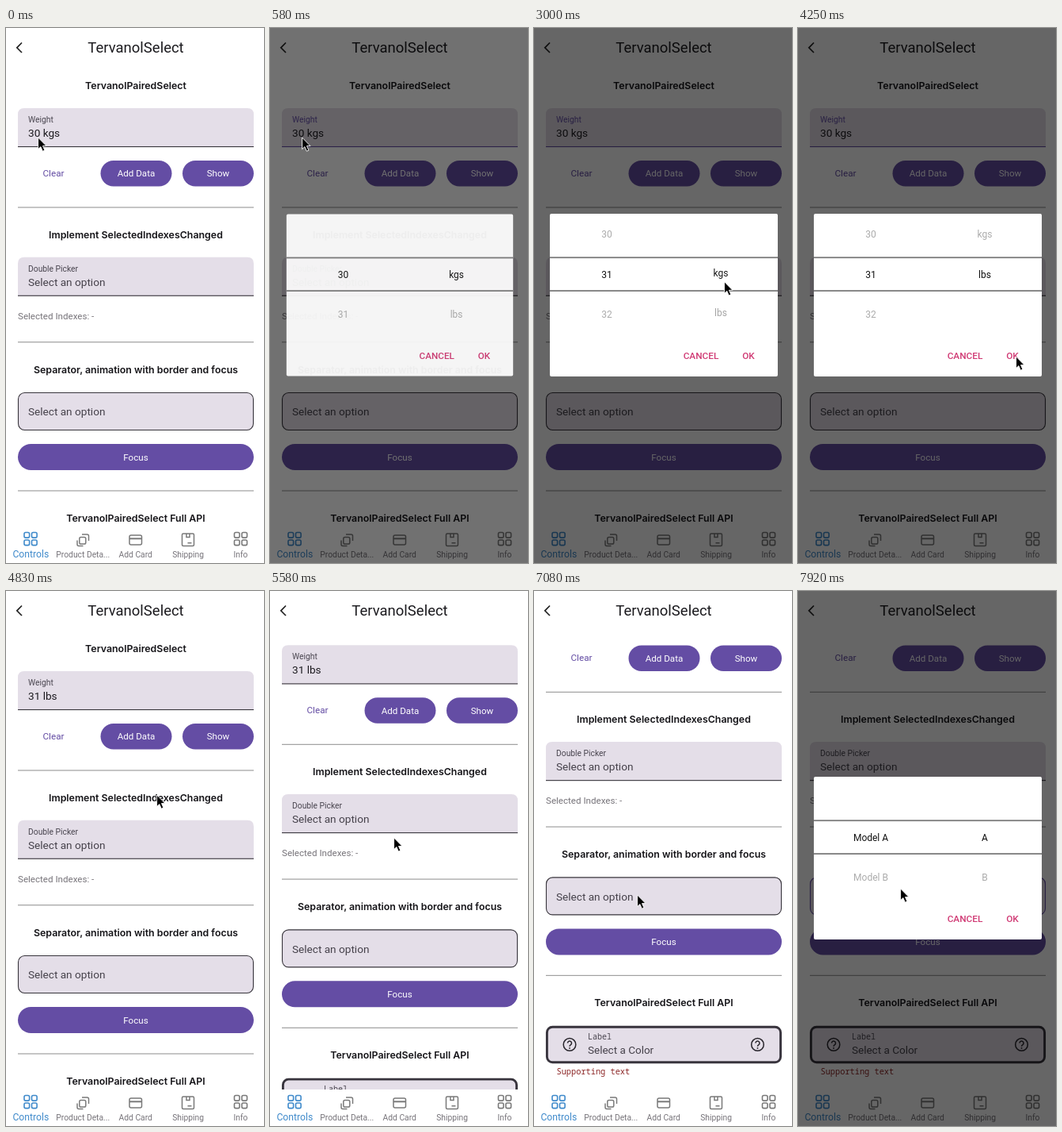
An HTML page that plays this animation: 326x674 px, repeating every 8 s.

```html
<!DOCTYPE html>
<html lang="en">
<head>
<meta charset="utf-8">
<title>Picker demo</title>
<style>
  html, body { margin: 0; width: 100%; height: 100%; overflow: hidden; background: #fff; }
  svg { display: block; width: 100vw; height: 100vh; }
  text { font-family: Roboto, sans-serif; white-space: pre; }
  .head { font: 600 12.4px Inter, sans-serif; fill: #151418; }
  .mono { font-family: "Noto Sans Mono", monospace; }
</style>
</head>
<body>
<svg id="stage" viewBox="0 0 326 674"></svg>
<script>
const LOOP = 8000, STEP = 50.5, SCROLL = 98.6;
const PURPLE = '#644da4', FILL = '#e4dee8', INK = '#38353c', HINT = '#45414a', GRAY = '#7a7a7a', BLUE = '#3f8acb';

const text = (x, y, size, fill, str, extra = '') =>
  `<text x="${x}" y="${y}" font-size="${size}" fill="${fill}" ${extra}>${str}</text>`;
const mid = (x, y, size, fill, str, extra = '') =>
  text(x, y, size, fill, str, 'text-anchor="middle" ' + extra);
const rect = (x, y, w, h, r, attrs) =>
  `<rect x="${x}" y="${y}" width="${w}" height="${h}" rx="${r}" ${attrs}/>`;
const path = (d, stroke, width, extra = '') =>
  `<path d="${d}" fill="none" stroke="${stroke}" stroke-width="${width}" ${extra}/>`;
const heading = (y, str) => `<text class="head" x="164" y="${y}" text-anchor="middle">${str}</text>`;
const divider = y => rect(15, y - .6, 298, 1.2, 0, 'fill="#a0a0a0"');
const button = (x, y, w, h, str) =>
  rect(x, y, w, h, h / 2, `fill="${PURPLE}"`) + mid(x + w / 2, y + h / 2 + 4, 11.6, '#fff', str);

const filledField = (y, label, value, color, id) =>
  `<path d="M15 ${y + 49}V${y + 8}q0-8 8-8H305q8 0 8 8V${y + 49}z" fill="${FILL}"/>` +
  rect(15, y + 48, 298, 1.1, 0, `id="${id}Line" fill="${INK}"`) +
  text(28, y + 18, 10.3, '#49454f', label, `id="${id}Label"`) +
  text(28, y + 36, 13.6, color, value, `id="${id}Value"`);

const help = (x, y) =>
  `<circle cx="${x}" cy="${y}" r="7.8" fill="none" stroke="#28252c" stroke-width="1.5"/>` +
  path(`M${x - 2.5} ${y - 1.8}a2.5 2.5 0 1 1 3.9 2.1q-1.4 .9-1.4 2.1`, '#28252c', 1.5) +
  `<circle cx="${x}" cy="${y + 4.5}" r=".95" fill="#28252c"/>`;

const gridIcon = (cx, color) => [[-8, 635.5], [1.5, 635.5], [-8, 645], [1.5, 645]]
  .map(([dx, y]) => rect(cx + dx, y, 6.6, 6.6, 1.8, `fill="none" stroke="${color}" stroke-width="1.6"`)).join('');

const content = `
  ${heading(77, 'TervanolPairedSelect')}
  ${filledField(101, 'Weight', '30 kgs', '#1d1b20', 'weight')}
  ${mid(60, 187, 11.7, PURPLE, 'Clear')}
  ${button(119.5, 167, 90, 32.5, 'Add Data')}
  ${button(223, 167, 90, 32.5, 'Show')}
  ${divider(226)}
  ${heading(265, 'Implement SelectedIndexesChanged')}
  ${filledField(288.7, 'Double Picker', 'Select an option', HINT, 'pair')}
  ${text(15, 367, 11.6, '#77747a', 'Selected Indexes: -')}
  ${divider(395.7)}
  ${heading(435, 'Separator, animation with border and focus')}
  ${rect(15.5, 459.5, 297, 47, 8, `id="boxed" fill="${FILL}" stroke="${INK}" stroke-width="1.1"`)}
  ${text(28, 488.3, 13.6, HINT, 'Select an option')}
  ${button(15, 524, 298, 33, 'Focus')}
  ${divider(583)}
  ${heading(622, 'TervanolPairedSelect Full API')}
  ${rect(16.4, 647.8, 295.2, 44.6, 7, `fill="${FILL}" stroke="#38343d" stroke-width="2.9"`)}
  ${help(45, 670)}${help(282.5, 670)}
  ${text(68, 664, 10, '#49454f', 'Label', 'class="mono"')}
  ${text(68, 681.8, 13.5, HINT, 'Select a Color')}
  ${text(28.5, 707.5, 10.3, '#8c2626', 'Supporting text', 'class="mono"')}`;

const tabs = `
  ${gridIcon(31, BLUE)}
  ${rect(92.8, 641.5, 8, 8.5, 1.8, `fill="none" stroke="${GRAY}" stroke-width="1.5"`)}
  ${path('M96 638h6.500q2 0 2 2v6M90 645.500v5q0 2 2 2h5.500', GRAY, 1.5)}
  ${rect(156, 639, 15.5, 12, 2, `fill="none" stroke="${GRAY}" stroke-width="1.5"`)}
  ${path('M156 643.3h15.5', GRAY, 2)}
  ${rect(222.5, 637, 15, 15.5, 1.5, `fill="none" stroke="${GRAY}" stroke-width="1.5"`)}
  ${path('M228 637v4.500h4V637M229.500 648.800h5', GRAY, 1.5)}
  ${gridIcon(296.5, GRAY)}
  ${mid(31.3, 667, 12.2, BLUE, 'Controls')}
  ${['Product Deta...', 'Add Card', 'Shipping', 'Info']
    .map((s, i) => mid(97.3 + 66.4 * i, 667, 10.3, '#77747a', s)).join('')}`;

const wheel = (name, x, items) => `<g id="${name}">` + items
  .map((s, i) => mid(x, 314.8 + STEP * i, 12, '#111', s)).join('') + '</g>';

const stage = document.getElementById('stage');
stage.innerHTML = `
  <defs>
    <clipPath id="page"><rect y="53" width="326" height="575"/></clipPath>
    <clipPath id="reel"><rect x="20" y="242" width="288" height="143"/></clipPath>
  </defs>
  <rect width="326" height="674" fill="#fff"/>
  <g clip-path="url(#page)"><g id="content">${content}</g></g>
  ${path('M20 18.5L13.8 24.8L20 31', '#222', 1.7)}
  ${mid(164, 31.2, 18.5, '#1c1b1f', 'TervanolSelect')}
  ${tabs}
  <rect id="dim" width="326" height="674"/>
  <g id="dialog">
    ${rect(20, 234, 288, 205, 2, 'fill="#fff"')}
    <g clip-path="url(#reel)">
      <g id="weights">${wheel('num', 92, ['30', '31', '32', '33'])}${wheel('unit', 236, ['kgs', 'lbs'])}</g>
      <g id="models">${wheel('model', 92, ['Model A', 'Model B'])}${wheel('letter', 236, ['A', 'B'])}</g>
    </g>
    ${rect(20, 288.3, 288, 1.8, 0, 'fill="#7c7c7c"')}
    ${rect(20, 330.2, 288, 1.8, 0, 'fill="#7c7c7c"')}
    ${mid(211, 417.2, 11.8, '#d03a74', 'CANCEL', 'font-weight="500"')}
    ${mid(271, 417.2, 11.8, '#d03a74', 'OK', 'font-weight="500"')}
  </g>
  <path id="cursor" d="M.6 0V14.6L3.9 11.600L6.300 17.200L8.900 16.100L6.500 10.600H11z"
    fill="#000" stroke="#fff" stroke-width=".9" stroke-linejoin="round"/>`;

const $ = id => document.getElementById(id);
const set = (id, key, value) => $(id).setAttribute(key, value);

const ease = (t, from, to) => {
  const u = Math.min(1, Math.max(0, (t - from) / (to - from)));
  return u * u * (3 - 2 * u);
};

// Cursor stops: time, x, y
const stops = [
  [0, 40, 138], [750, 40, 138], [1500, 103, 298], [1600, 102, 298], [2008, 99, 247.5],
  [2250, 99, 247.5], [2850, 240, 322], [2950, 240, 322], [3350, 238, 271.5],
  [3500, 238, 271.5], [4100, 275, 414], [4400, 275, 414], [4800, 190, 257], [4860, 190, 257],
  [5200, 157, 343.5], [5250, 157, 343.5], [6109, 154, 245], [6250, 154, 245],
  [6950, 130, 383], [7550, 130, 383], [7850, 129, 375], [8000, 129, 375]
];

function cursorAt(t) {
  const i = Math.max(1, stops.findIndex(s => s[0] > t));
  const [t0, x0, y0] = stops[i - 1], [t1, x1, y1] = stops[i];
  const k = ease(t, t0, t1);
  return [x0 + (x1 - x0) * k, y0 + (y1 - y0) * k];
}

// Moves a reel; items fade with distance from its centre
function turn(id, shift) {
  set(id, 'transform', `translate(0 ${-shift})`);
  [...$(id).children].forEach((item, i) => {
    const d = Math.abs(STEP * i - shift);
    item.setAttribute('opacity', Math.max(0, 1 - .0129 * d - .02 * Math.max(0, d - STEP)));
  });
}

function draw(t) {
  const second = t > 6000;
  const open = second ? ease(t, 7380, 7620) : ease(t, 380, 620) - ease(t, 4320, 4500);
  const focus = t > 330 && t < 4330;

  set('content', 'transform', `translate(0 ${-SCROLL * ease(t, 5250, 6109)})`);
  set('weightLabel', 'fill', focus ? PURPLE : '#49454f');
  set('weightLine', 'fill', focus ? PURPLE : INK);
  set('boxed', 'stroke', t > 7330 ? PURPLE : INK);
  $('weightValue').textContent = t < 4310 ? '30 kgs' : '31 lbs';

  set('dim', 'opacity', .6 * open);
  set('dialog', 'opacity', open);
  const scale = t > 4300 && !second ? 1 : .92 + .08 * open;
  set('dialog', 'transform', `translate(164 336.5) scale(${scale}) translate(-164 -336.5)`);
  set('weights', 'visibility', second ? 'hidden' : 'visible');
  set('models', 'visibility', second ? 'visible' : 'hidden');
  turn('num', STEP * ease(t, 1600, 2008));
  turn('unit', STEP * ease(t, 2950, 3350));
  turn('model', 0);
  turn('letter', 0);

  set('cursor', 'transform', `translate(${cursorAt(t)})`);
}

const start = performance.now();
function tick() {
  draw((performance.now() - start) % LOOP);
  requestAnimationFrame(tick);
}
tick();
</script>
</body>
</html>
```
